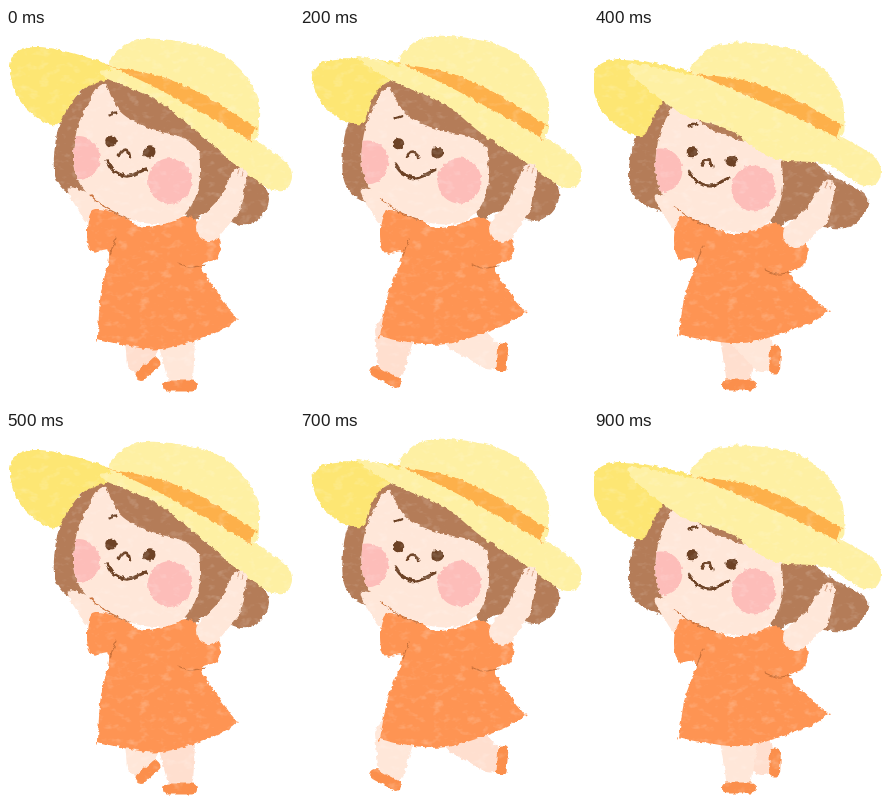
Recreate the animation shown at these times as an HTML page. Size 288 by 375 pixels, loop 1000 ms.

```html
<!DOCTYPE html>
<html lang="en">
<head>
<meta charset="utf-8">
<title>Running girl in a sun hat</title>
<style>
html, body { margin: 0; width: 100%; height: 100%; overflow: hidden; background: #fff; }
svg { display: block; width: 100vw; height: 100vh; }
</style>
</head>
<body>
<svg id="stage" viewBox="0 0 288 375">
  <defs>
    <filter id="crayon" filterUnits="userSpaceOnUse" x="-20" y="-20" width="328" height="415" color-interpolation-filters="sRGB">
      <feTurbulence type="fractalNoise" baseFrequency="0.2" numOctaves="2" seed="4" result="grain"/>
      <feDisplacementMap in="SourceGraphic" in2="grain" scale="4.5" xChannelSelector="R" yChannelSelector="G" result="rough"/>
      <feTurbulence type="fractalNoise" baseFrequency="0.09 0.14" numOctaves="3" seed="9"/>
      <feColorMatrix values="0 0 0 0 1  0 0 0 0 1  0 0 0 0 1  0.6 0 0 0 -0.33" result="chalk"/>
      <feComposite in="chalk" in2="rough" operator="atop"/>
    </filter>
    <clipPath id="cheeks"><path id="cheekEdge"/></clipPath>
  </defs>
  <g id="girl" filter="url(#crayon)"></g>
</svg>
<script>
const STEP = 100, STEPS = 10;
const INK = { skin: '#ffe7d9', far: '#ffdfcf', hair: '#b47c58', hat: '#fef0a3', under: '#fde673', band: '#fdb04a',
  dress: '#fe9453', shoe: '#fb8f4c', cheek: '#fdbdb9', dark: '#6d4225', fold: '#c9713a', finger: '#d9a488' };

// Key poses of one stride. head and hat: x, y, tilt of their pivot; flap: turn and size
// of the left brim; lip: how far the brim folds left and dips; sway: swing of the hair
const poses = [
  { head: [119, 124, 0], hat: [176, 73, 0], flap: [0, 1], lip: [2, 0], sway: 0,
    body: [0, 0], hand: [234, 147], hem: [92, 311, 231, 291] },
  { head: [119, 111, 0], hat: [175, 55, 0], flap: [-8, 1], lip: [4, 7], sway: -4,
    body: [2, -8], hand: [239, 131], hem: [79, 287, 227, 279] },
  { head: [113, 126, -3], hat: [172, 70, 0], flap: [-11, 0.88], lip: [40, 7], sway: 0,
    body: [-1, 1], hand: [230, 143], hem: [80, 308, 225, 284] },
  { head: [109, 143, -3], hat: [166, 75, -5], flap: [4, 0.88], lip: [44, 13], sway: 20,
    body: [-4, 14], hand: [225, 151], hem: [78, 308, 237, 280] },
  { head: [113, 134, -3], hat: [172, 75, -4], flap: [0, 1], lip: [60, 28], sway: 14,
    body: [-1, 7], hand: [234, 160], hem: [85, 306, 234, 283] }
];

// Path of one shoe through two strides: x, y, angle. The far foot runs half a loop behind.
const footPath = [
  [174, 358, 0], [223, 323, -66], [202, 329, -85], [204, 322, -86], [181, 331, -88],
  [142, 341, -42], [75, 323, 31], [86, 349, 28], [110, 357, 0], [145, 357, 0]
];

// Smooth path through points; a repeated point makes a corner
function curve(s, closed) {
  const p = s.split(' ').map(q => q.split(',').map(Number)), n = p.length;
  const at = i => closed ? p[(i + n) % n] : p[Math.max(0, Math.min(n - 1, i))];
  let d = 'M' + p[0];
  for (let i = 0; i < (closed ? n : n - 1); i++) {
    const [a, b, c, e] = [at(i - 1), at(i), at(i + 1), at(i + 2)];
    const c1 = b.map((v, k) => v + (c[k] - a[k]) / 6);
    const c2 = c.map((v, k) => v - (e[k] - b[k]) / 6);
    d += `C${c1} ${c2} ${c}`;
  }
  return d + (closed ? 'Z' : '');
}

const fill = (s, color) => `<path d="${curve(s, true)}" fill="${color}"/>`;
const line = (s, color, width) =>
  `<path d="${curve(s, false)}" fill="none" stroke="${color}" stroke-width="${width}" stroke-linecap="round"/>`;
const oval = (x, y, rx, ry, color) => `<ellipse cx="${x}" cy="${y}" rx="${rx}" ry="${ry}" fill="${color}"/>`;
const group = (transform, content) => `<g transform="${transform}">${content}</g>`;

// Moves a part drawn around the pivot px, py
const place = ([x, y, tilt], px, py, content) =>
  group(`translate(${x} ${y}) rotate(${tilt}) translate(${-px} ${-py})`, content);

// Tapered limb with round ends
function limb([ax, ay], [bx, by], ra, rb, color) {
  const len = Math.hypot(bx - ax, by - ay) || 1;
  const nx = (ay - by) / len, ny = (bx - ax) / len;
  const side = (x, y, r) => `${x + nx * r},${y + ny * r}`;
  return `<path fill="${color}" d="M${side(ax, ay, ra)}L${side(bx, by, rb)}A${rb},${rb} 0 0 0 ${side(bx, by, -rb)}`
    + `L${side(ax, ay, -ra)}A${ra},${ra} 0 0 0 ${side(ax, ay, ra)}Z"/>`;
}

const FACE = '102,56 82,76 70,106 68,140 82,166 116,188 148,196 174,190 190,168 194,140 188,112 150,90';
document.getElementById('cheekEdge').setAttribute('d', curve(FACE, true));

const backHair = s =>
  fill(`103,46 75,63 ${56 - s / 4},90 ${49 - s / 2},118 ${49 - s / 2},148 ${62 - s / 3},165 82,166 100,100`, INK.hair)
  + fill(`180,105 215,122 245,145 ${262 + s},165 ${259 + s},184 ${241 + s},197 219,192 200,186 182,192 175,150`, INK.hair);

const face = fill(FACE, INK.skin)
  + `<g clip-path="url(#cheeks)">${oval(73, 130, 21, 22, INK.cheek)}${oval(164, 153, 22, 23, INK.cheek)}</g>`
  + fill('100,44 106,70 118,87 145,101 175,109 196,122 196,100 140,58', INK.hair)
  + oval(105, 113, 5.8, 5.6, INK.dark) + oval(143.5, 124, 6, 5.8, INK.dark)
  + line('113,127 117,122 122,123 124,129', INK.dark, 2.8)
  + line('101,133 108,143 122,148 140,141', INK.dark, 3.2)
  + line('103,87 110,85', INK.dark, 3.2)
  + line('84,167 102,181 124,191', INK.fold, 1.1);

function hat([turn, size], [fold, dip]) {
  const low = (x, y) => `${x - 0.45 * dip},${y + 0.9 * dip}`;
  const flap = fill('4,42 9,26 28,19 62,24 110,40 104,50 76,62 60,84 51,97 33,91 12,70', INK.under);
  return group(`translate(102 45) rotate(${turn}) scale(${size}) translate(-102 -45)`, flap)
    + fill('104,40 118,18 140,11 172,13 208,22 235,42 250,66 253,90 246,112 200,92 150,65', INK.hat)
    + fill(`${102 - fold},${43 - 0.3 * fold} 150,56 200,82 246,110 278,132 286,148 279,162 262,160 `
      + `231,138 ${low(190, 103)} ${low(150, 72)} ${low(100, 50)}`, INK.hat)
    + fill('107,39 107,39 160,50 210,74 249,100 249,100 244,112 244,112 200,87 150,60', INK.band);
}

function dress([dx, dy], [lx, ly, rx, ry]) {
  const top = '86,183 103,183 122,191 138,199 160,195 182,188 200,201 214,211 211,230 196,238'
    .split(' ').map(q => q.split(',').map(Number)).map(([x, y]) => `${x + dx},${y + dy}`).join(' ');
  const mid = (lx + rx) / 2;
  const skirt = `${(rx + 196 + dx) / 2 - 2},${(ry + 238 + dy) / 2} ${rx},${ry} ${rx},${ry} ${rx - 22},${ry + 14} `
    + `${mid - 6},${(ly + ry) / 2 + 20} ${lx + 22},${ly + 5} ${lx},${ly} ${lx},${ly}`;
  const armpit = `${(lx + 103 + dx) / 2 - 3},${(ly + 225 + dy) / 2} ${103 + dx},${225 + dy} ${86 + dx},${224 + dy} ${81 + dx},${205 + dy}`;
  return fill(`${top} ${skirt} ${armpit}`, INK.dress);
}

function arm([dx, dy], [hx, hy]) {
  const shoulder = [203 + dx, 200 + dy];
  const elbow = [(shoulder[0] + hx) / 2 + 4, (shoulder[1] + hy) / 2 + 5];
  return limb(shoulder, elbow, 13, 12, INK.skin) + limb(elbow, [hx, hy], 12, 7.5, INK.skin)
    + line(`${hx - 3},${hy} ${hx - 1},${hy - 6}`, INK.finger, 1.1)
    + line(`${hx + 2},${hy + 1} ${hx + 4},${hy - 5}`, INK.finger, 1.1);
}

function leg(step, color) {
  const [x, y, angle] = footPath[step % STEPS], a = angle * Math.PI / 180;
  const planted = y > 345;
  const hip = planted ? [145 + (x - 145) * 0.85, 305] : [135 + (x - 135) * 0.4, 305];
  const ankle = [x + 12 * Math.sin(a), y - 12 * Math.cos(a)];
  return limb(hip, ankle, 20, 13.5, color)
    + `<rect x="-17" y="-5.5" width="34" height="11" rx="5" fill="${INK.shoe}" transform="translate(${x} ${y}) rotate(${angle}) scale(${planted ? 1 : 0.85} 1)"/>`;
}

function figure(step) {
  const p = poses[step % poses.length], shift = `translate(${p.body})`;
  return place(p.head, 119, 124, backHair(p.sway))
    + group(shift, fill('62,160 84,166 102,182 86,198 71,180', INK.skin))
    + leg(step + STEPS / 2, INK.far) + leg(step, INK.skin)
    + dress(p.body, p.hem)
    + group(shift, line('110,210 104,227', INK.fold, 1.1) + line('172,235 184,239 199,237', INK.fold, 1.1))
    + place(p.head, 119, 124, face)
    + place(p.hat, 176, 73, hat(p.flap, p.lip))
    + arm(p.body, p.hand);
}

const girl = document.getElementById('girl');
const start = performance.now();
let shown = -1;

function show(time) {
  const step = Math.floor(Math.max(0, time) / STEP) % STEPS;
  if (step === shown) return;
  girl.innerHTML = figure(step);
  shown = step;
}

function tick(now) {
  show(now - start);
  requestAnimationFrame(tick);
}
show(0);
requestAnimationFrame(tick);
</script>
</body>
</html>
```
